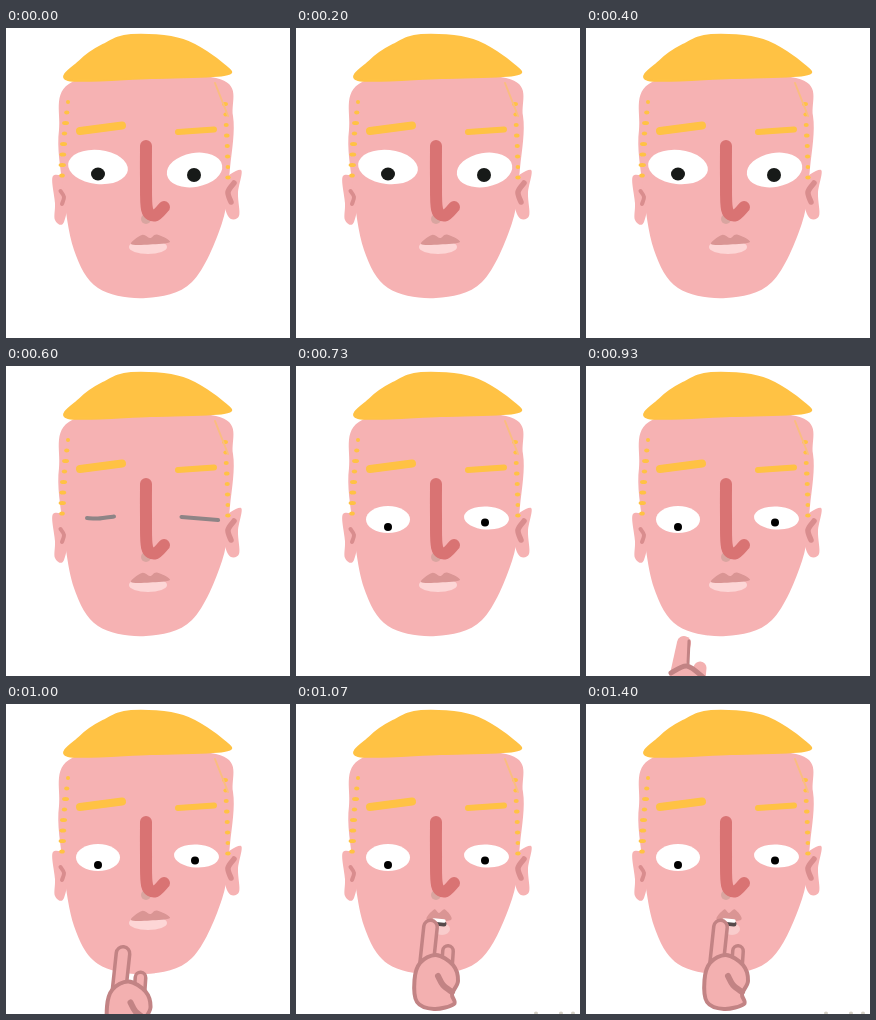
An HTML page that plays this animation: 284 px wide and 310 px high, repeating every 1540 ms.

```html
<!DOCTYPE html>
<html lang="en">
<head>
<meta charset="utf-8">
<title>Hush</title>
<style>
html, body { margin: 0; width: 100%; height: 100%; overflow: hidden; background: #fff; }
svg { display: block; width: 284px; height: 310px; }
path { stroke-linecap: round; stroke-linejoin: round; }
</style>
</head>
<body>
<svg id="stage" viewBox="0 0 284 310"></svg>
<script>
const NS = 'http://www.w3.org/2000/svg';
const stage = document.getElementById('stage');
const C = {
  skin: '#f6b2b3', hair: '#ffc244', nose: '#d97373', ear: '#d98d8e', lip: '#da9594',
  paleLip: '#fdd6d6', lid: '#8e8486', ink: '#171a18', hand: '#f3b0b0', line: '#c28384'
};

function add(parent, tag, attrs = {}) {
  const el = document.createElementNS(NS, tag);
  for (const key in attrs) el.setAttribute(key, attrs[key]);
  parent.appendChild(el);
  return el;
}
const group = () => add(stage, 'g');

// Smooth curve through "x,y x,y ..." points
function curve(text, closed) {
  const p = text.split(' ').map(s => s.split(',').map(Number));
  const n = p.length;
  const at = i => closed ? p[(i + n) % n] : p[Math.max(0, Math.min(n - 1, i))];
  let d = 'M' + p[0];
  for (let i = 0; i < (closed ? n : n - 1); i++) {
    const [a, b, c, e] = [at(i - 1), at(i), at(i + 1), at(i + 2)];
    const c1 = b.map((v, k) => v + (c[k] - a[k]) / 6);
    const c2 = c.map((v, k) => v - (e[k] - b[k]) / 6);
    d += `C${c1} ${c2} ${c}`;
  }
  return closed ? d + 'Z' : d;
}
const blob = (g, points, fill, edge = 'none', width = 0) =>
  add(g, 'path', { d: curve(points, true), fill, stroke: edge, 'stroke-width': width });
const stroke = (g, points, color, width) =>
  add(g, 'path', { d: curve(points), fill: 'none', stroke: color, 'stroke-width': width });
const oval = (g, cx, cy, rx, ry, fill, tilt = 0) =>
  add(g, 'ellipse', { cx, cy, rx, ry, fill, transform: `rotate(${tilt} ${cx} ${cy})` });

function limb(g, points, width) {
  stroke(g, points, C.line, width);
  stroke(g, points, C.hand, width - 7);
}

function random(seed) {
  return () => (seed = seed * 16807 % 2147483647) / 2147483647;
}

// Head
const head = group();
blob(head, '64,156 47,148 49,175 49,192 58,194', C.skin);
blob(head, '216,156 235,142 232,165 233,188 222,188', C.skin);
blob(head, '71,52 53,102 57,160 68,222 92,260 140,270 186,254 216,195 224,140 227,88 210,50', C.skin);
stroke(head, '54.5,163 58,169 56,176', C.ear, 4);
stroke(head, '228,155 222,164 225,174', C.ear, 5.5);

const rand = random(7);
for (let i = 0; i < 8; i++) {
  const y = 74 + i * 10.5;
  const bulge = 6 * Math.sin((y - 74) / 50);
  oval(head, 62 - bulge, y, 2 + 2 * rand(), 2, C.hair);
  oval(head, 219 + bulge / 2, y + 2, 2 + rand(), 2, C.hair);
}
stroke(head, '209,55 222,88', '#fabd80', 2);

stroke(head, '74,103 116,97.5', C.hair, 8);
stroke(head, '172,104 208,101.5', C.hair, 6);
blob(head, '62,52 74,33 97,17 125,7 177,12 218,37 218,47 145,50', C.hair, C.hair, 2);

oval(head, 140, 191, 5, 5, '#d9a5a0');
stroke(head, '140,118 140,150 141,181 149,187.5 158,179', C.nose, 12);

// Eyes
const eyes = { wide: group(), narrow: group(), shut: group() };
oval(eyes.wide, 92, 139, 30, 17, '#fff', 6);
oval(eyes.wide, 188.5, 142, 28, 17, '#fff', -10);
oval(eyes.wide, 92, 146, 7, 6.5, C.ink);
oval(eyes.wide, 188, 147, 7, 7, C.ink);

oval(eyes.narrow, 92, 153.5, 22, 13.5, '#fff');
oval(eyes.narrow, 190.5, 152, 22.5, 11.5, '#fff', 3);
oval(eyes.narrow, 92, 161, 4, 4, '#000');
oval(eyes.narrow, 189, 156.5, 4, 4, '#000');

stroke(eyes.shut, '81,152 92,152.5 108,150.5', C.lid, 4);
stroke(eyes.shut, '175.5,151 212,154', C.lid, 4);

// Mouths
const mouths = { closed: group(), open: group() };
oval(mouths.closed, 142, 219, 19, 7, C.paleLip);
blob(mouths.closed, '125,216 136,207 144,210 151,206.5 164,214 144,216.5', C.lip);

oval(mouths.open, 146, 225, 8, 6, '#f9cccc');
blob(mouths.open, '131,216 138,205.5 143,209 149,205.5 155,216', C.lip);
stroke(mouths.open, '139,219 148,220', '#554a4b', 5);
stroke(mouths.open, '138,216 148,217', '#fff', 3.5);

// Hands
const hands = { rising: group(), hush: group() };
const r = hands.rising;
stroke(r, '98,277 88,322', C.hand, 14);
stroke(r, '114,302 110,345', C.hand, 13);
stroke(r, '101,308 100,345', C.hand, 16);
stroke(r, '103,275 102,298', C.line, 3);
stroke(r, '85,307 101,300 118,312', C.line, 5);

const h = hands.hush;
limb(h, '134.5,223 130,265', 17);
limb(h, '152,247 151,262', 14);
blob(h, '124,259 140,251 157,261 162,277 156,290 158,300 138,305 121,298 118.5,276', C.hand, C.line, 4);
stroke(h, '142,272 147,281 156,288', C.line, 6);

const specks = group();
for (const x of [240, 265, 277]) oval(specks, x, 309, 2, 1.5, '#d6d1c6');

const LOOP = 1540;
const looks = [[0, 'wide'], [70, 'shut'], [200, 'wide'], [600, 'shut'], [730, 'narrow']];
const lifts = [870, 930, 1000, 1070];

function show(set, name) {
  for (const key in set) set[key].style.display = key === name ? '' : 'none';
}

function draw(time) {
  show(eyes, looks.filter(([start]) => start <= time).pop()[1]);

  // Every lift moves the hand by one equal stride towards the lips
  const left = lifts.filter(start => start > time).length;
  show(mouths, left ? 'closed' : 'open');
  show(hands, left === lifts.length ? '' : left > 1 ? 'rising' : 'hush');
  const move = n => `translate(${-17.5 * n} ${26.5 * n})`;
  hands.hush.setAttribute('transform', move(left));
  hands.rising.setAttribute('transform', move(left - 2));
  specks.style.display = left ? 'none' : '';
}

const begin = performance.now();
function tick() {
  draw((performance.now() - begin) % LOOP);
  requestAnimationFrame(tick);
}
tick();
</script>
</body>
</html>
```
